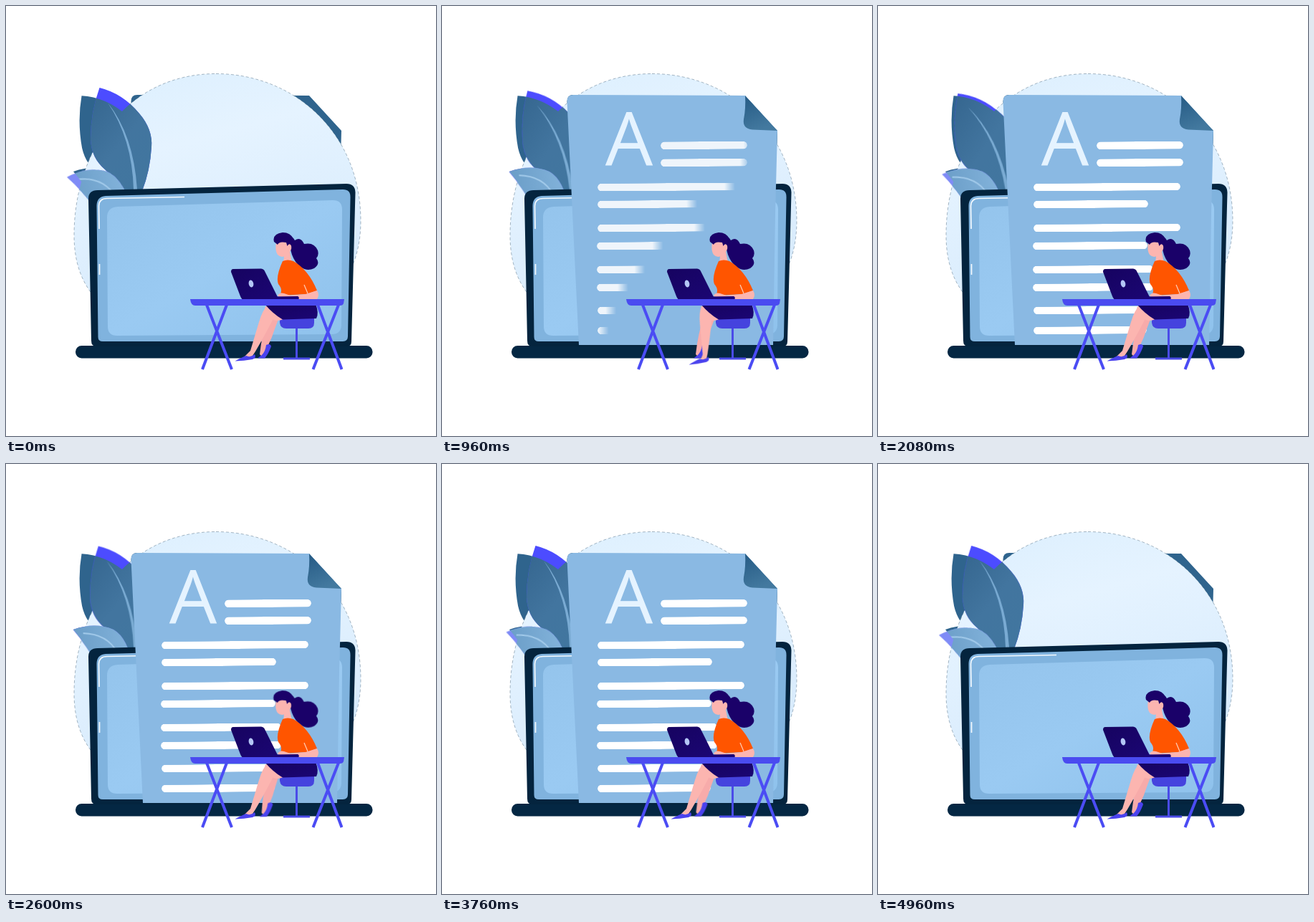
An HTML page that plays this animation: 600x600 px, repeating every 5000 ms.

```html
<!DOCTYPE html>
<html lang="en">
<head>
<meta charset="utf-8">
<title>Writing at a desk</title>
<style>
  html, body { margin: 0; width: 100%; height: 100%; overflow: hidden; background: #fff; }
  .stage { position: relative; width: 600px; height: 600px; overflow: hidden; }
  svg { position: absolute; left: 0; top: 0; width: 600px; height: 600px; }

  /* plants */
  .leaf, .sprig { animation: sway 625ms cubic-bezier(.37, 0, .63, 1) infinite alternate; }
  .leaf { transform-origin: 180px 258px; --from: 0deg; --to: -10.3deg; }
  .sprig { transform-origin: 145px 300px; animation-duration: 833.333ms; --from: -8deg; --to: 0deg; }
  @keyframes sway {
    from { transform: rotate(var(--from)); }
    to { transform: rotate(var(--to)); }
  }

  /* document */
  .paper, .rise { animation: 5s cubic-bezier(.65, 0, .35, 1) infinite; }
  .paper { transform-origin: 305px 263px; animation-name: turn; }
  .rise { animation-name: rise; }
  @keyframes turn {
    0%, 1% { transform: rotate(32deg); }
    16%, 85% { transform: none; }
    98.6%, 100% { transform: rotate(32deg); }
  }
  @keyframes rise {
    0%, 1% { transform: translateY(580px); }
    16%, 85% { transform: none; }
    98.6%, 100% { transform: translateY(580px); }
  }
  .letter {
    font: 400 105px "Open Sans", "Noto Sans", sans-serif; text-anchor: middle;
    transform-origin: 261px 223px; animation: letter 5s ease-in-out infinite;
  }
  @keyframes letter {
    0%, 2% { opacity: 0; transform: scale(1.12); fill: #fff; }
    7% { opacity: .9; transform: scale(1.05); fill: #fafdff; }
    13%, 77% { opacity: 1; transform: none; fill: #e5f3ff; }
    85%, 100% { opacity: 0; transform: scale(1.06); fill: #e5f3ff; }
  }

  .line {
    --soft: 15px; --edge: calc(50% - var(--soft) / 2);
    position: absolute; left: var(--x); top: var(--y); width: var(--w); height: 11px;
    transform: rotate(-.3deg);
    animation: erase 5s calc(var(--i) * 24ms) infinite both;
    -webkit-mask: linear-gradient(90deg, transparent var(--edge), #000 calc(50% + var(--soft) / 2)) 100% 0 / calc(200% + var(--soft)) 100% no-repeat;
    mask: linear-gradient(90deg, transparent var(--edge), #000 calc(50% + var(--soft) / 2)) 100% 0 / calc(200% + var(--soft)) 100% no-repeat;
  }
  .line::before {
    content: ""; position: absolute; inset: 0; border-radius: 6px; background: #fff;
    animation: write 5s calc(var(--i) * 35ms) infinite both;
    -webkit-mask: linear-gradient(90deg, #000 var(--edge), transparent calc(50% + var(--soft) / 2)) 100% 0 / calc(200% + var(--soft)) 100% no-repeat;
    mask: linear-gradient(90deg, #000 var(--edge), transparent calc(50% + var(--soft) / 2)) 100% 0 / calc(200% + var(--soft)) 100% no-repeat;
  }
  @keyframes write {
    0%, 9.6% { -webkit-mask-position: 100% 0; mask-position: 100% 0; animation-timing-function: cubic-bezier(.65, 0, .35, 1); }
    21.6%, 100% { -webkit-mask-position: 0 0; mask-position: 0 0; }
  }
  @keyframes erase {
    0%, 80.8% { -webkit-mask-position: 100% 0; mask-position: 100% 0; animation-timing-function: cubic-bezier(.65, 0, .35, 1); }
    92.8%, 100% { -webkit-mask-position: 0 0; mask-position: 0 0; }
  }
  .lines { animation: dim 5s linear infinite; }
  @keyframes dim {
    0%, 19% { opacity: .86; }
    23%, 80% { opacity: 1; }
    87%, 100% { opacity: .78; }
  }

  /* woman */
  .shin, .shoe, .back-shin, .back-shoe, .head { animation: 5s ease-in-out infinite; }
  .shin { transform-origin: 366px 425px; animation-name: kick; --turn: -22deg; }
  .shoe { transform-origin: 344px 486px; animation-name: kick; --turn: 19deg; }
  .back-shin { transform-origin: 372px 436px; animation-name: shift; --turn: -19deg; }
  .back-shoe { transform-origin: 361px 482px; animation-name: shift; --turn: 10deg; }
  .head { transform-origin: 396px 358px; animation-name: shift; --turn: -4deg; }
  @keyframes kick {
    0%, 4% { transform: none; }
    19.2% { transform: rotate(var(--turn)); }
    35%, 100% { transform: none; }
  }
  @keyframes shift {
    0%, 48% { transform: none; }
    62.4% { transform: rotate(var(--turn)); }
    77%, 100% { transform: none; }
  }
</style>
</head>
<body>
<div class="stage">
  <svg viewBox="0 0 600 600">
    <defs>
      <linearGradient id="sky" x1="0" y1="0" x2=".3" y2="1">
        <stop offset="0" stop-color="#dceffe"/><stop offset=".35" stop-color="#e5f3ff"/><stop offset="1" stop-color="#d6eafc"/>
      </linearGradient>
      <linearGradient id="leafFill" x1=".1" y1="0" x2=".8" y2="1">
        <stop offset="0" stop-color="#35668f"/><stop offset=".55" stop-color="#42759f"/><stop offset="1" stop-color="#41769f"/>
      </linearGradient>
      <linearGradient id="sprigFill">
        <stop offset="0" stop-color="#6a9dc7"/><stop offset="1" stop-color="#84b4dc"/>
      </linearGradient>
      <linearGradient id="foldFill" x1="0" y1="0" x2=".4" y2="1">
        <stop offset="0" stop-color="#255a84"/><stop offset="1" stop-color="#43799f"/>
      </linearGradient>
      <linearGradient id="glass" x1="0" y1="0" x2="1" y2="1">
        <stop offset="0" stop-color="#94c4ec"/><stop offset=".5" stop-color="#9acaf2"/><stop offset="1" stop-color="#8fc2ec"/>
      </linearGradient>
      <linearGradient id="fade" x1="0" y1="0" x2="0" y2="1">
        <stop offset="0" stop-color="#fff" stop-opacity="0"/><stop offset="1" stop-color="#fff"/>
      </linearGradient>

      <path id="blob" d="M293 94.500C400 94.500 495 175 495 300C495 400 420 460 300 460C170 460 95 420 95 320C95 200 170 94.500 293 94.500Z"/>
      <path id="leafShape" d="M130.500 114Q163 122 186 150Q205 172 203 197Q201 230 190 258H160Q154 243 138 228Q119 212 118 186Q118 148 130.500 114Z"/>
      <path id="sprigShape" d="M94 231Q125 220 150 231Q170 242 178 286L130 284Q112 252 94 231Z"/>
      <path id="lid" d="M128 257L475 248Q487 248 487.500 260L482 468Q482 475 476 475L126 475Q119 475 119 467L115 269Q115 257 128 257Z"/>
      <rect id="bar" x="97" y="474" width="414.500" height="17.500" rx="8.500"/>
      <path id="sheet" d="M183 124L423 125L468 174L465 290L462 473L191 473L174.500 134Q174 124 183 124Z"/>

      <clipPath id="visible">
        <use href="#blob"/><use href="#lid"/><use href="#bar"/><use href="#sheet"/>
        <use href="#leafShape" transform="rotate(-10.3 180 258)"/><use href="#sprigShape"/>
      </clipPath>
      <mask id="reveal" maskUnits="userSpaceOnUse" x="0" y="0" width="600" height="600">
        <g class="rise">
          <rect y="-107" width="600" height="220" fill="url(#fade)"/>
          <rect y="113" width="600" height="600" fill="#fff"/>
        </g>
      </mask>
    </defs>

    <g fill="#2f648d">
      <use href="#sheet"/>
      <use href="#leafShape" transform="rotate(-10.3 180 258)"/>
      <use href="#sprigShape"/>
    </g>
    <use href="#blob" fill="url(#sky)" stroke="#35566e" stroke-width=".6" stroke-opacity=".7" stroke-dasharray="4 3"/>

    <g class="leaf"><use href="#leafShape" fill="#4c4cff"/></g>
    <g clip-path="url(#visible)">
      <g class="leaf">
        <use href="#leafShape" fill="url(#leafFill)"/>
        <path d="M142 135Q178 180 183 256L178 256Q176 185 142 135Z" fill="#7aabd3"/>
      </g>
    </g>
    <g class="sprig"><use href="#sprigShape" fill="#7f8bf6"/></g>
    <g clip-path="url(#visible)">
      <g class="sprig">
        <use href="#sprigShape" fill="url(#sprigFill)"/>
        <path d="M108 236Q142 237 156 264" fill="none" stroke="#a3cbeb" stroke-width="1.800"/>
      </g>
    </g>

    <use href="#bar" fill="#042743"/>
    <use href="#lid" fill="#04243e"/>
    <path d="M139 265L470 256Q481 256 480.500 267L477 461Q477 468 470 468L135 468Q128.500 468 128.500 462L126.500 279Q126.500 266 139 265Z" fill="#80b3de"/>
    <path d="M156 280L456 271Q469 271 469 284L468 446Q467 458 455 458L155 460Q142 460 142 447L141 295Q141 281 156 280Z" fill="url(#glass)"/>
    <path d="M130 311L129.500 279Q130 268.500 141 268.500L249 266.500M130.500 360V375" fill="none" stroke="#f4faff" stroke-width="1.700"/>

    <g clip-path="url(#visible)">
      <g class="paper">
        <g mask="url(#reveal)">
          <use href="#sheet" fill="#8ab9e3"/>
          <path d="M423 125L468 174L433 172.500Q419 171 421 158Q424 143 423 125Z" fill="url(#foldFill)"/>
        </g>
      </g>
    </g>
    <text class="letter" x="261" y="223">A</text>
  </svg>

  <div class="lines">
    <div class="line" style="--i:0;--x:305px;--y:189px;--w:121px"></div>
    <div class="line" style="--i:1;--x:305px;--y:212.500px;--w:121px"></div>
    <div class="line" style="--i:2;--x:217px;--y:246.500px;--w:205px"></div>
    <div class="line" style="--i:3;--x:217px;--y:270.500px;--w:160px"></div>
    <div class="line" style="--i:4;--x:217px;--y:303.500px;--w:205px"></div>
    <div class="line" style="--i:5;--x:215.500px;--y:328.500px;--w:160px"></div>
    <div class="line" style="--i:6;--x:215.500px;--y:361.500px;--w:168px"></div>
    <div class="line" style="--i:7;--x:215.500px;--y:386.500px;--w:168px"></div>
    <div class="line" style="--i:8;--x:217px;--y:419px;--w:158px"></div>
    <div class="line" style="--i:9;--x:217px;--y:446.500px;--w:158px"></div>
  </div>

  <svg viewBox="0 0 600 600">
    <defs>
      <linearGradient id="navy" x1="0" y1="0" x2="1" y2="1">
        <stop offset="0" stop-color="#160360"/><stop offset="1" stop-color="#1b0674"/>
      </linearGradient>
    </defs>

    <!-- stool -->
    <path d="M405.500 448V492M387 492H424" stroke="#4a4be8" stroke-width="3" fill="none"/>
    <path d="M382 436H430V442Q430 450 422 450H391Q383 450 382 442Z" fill="#4543de"/>

    <!-- legs -->
    <g class="back-shin">
      <path d="M366 430L381 435Q375 450 371 462L362 482L357 489L354 486Q357 458 366 430Z" fill="#f7abaa"/>
      <path class="back-shoe" d="M351 491.500L357 487Q362 482 363 473Q369 470 370 475Q366 486 361 491.500Z" fill="#4a42ee"/>
    </g>
    <g class="shin">
      <path d="M365 418Q358 424 353 441L341 481L333 489L342 491L348 482Q362 458 372 438Q376 424 365 418Z" fill="#fcb5b0"/>
      <path class="shoe" d="M319.500 495.500Q329 490 335 488Q341 491 347 486Q350 491 344 493Q332 495 319.500 495.500Z" fill="#4a42ee"/>
    </g>
    <path d="M361 421Q366 415 374 418L387 437Q378 441 371 437Z" fill="#fcb5b0"/>
    <path d="M361 416H432Q437 428 433 436L386 437.500Q373 430 361 416Z" fill="url(#navy)"/>

    <!-- head -->
    <g class="head">
      <path d="M392 322Q399 319 403 327Q411 321 416 332Q430 329 435 341Q437 348 433 352Q439 360 430 366Q420 371 411 364Q403 358 399 347Z" fill="#1a0169"/>
      <path d="M377 330Q375 341 379 347Q383 351 388 349.500L387 358L399 358L396 343Q400 338 397 332Q393 325 377 330Z" fill="#fcb5b0"/>
      <path d="M374 329Q371 318 386 316Q397 316 401 325L398 334Q395 330 392.500 335L391 330Q381 328 379 333Z" fill="#1a0169"/>
    </g>

    <!-- body -->
    <path d="M386 356Q393 353 401 356Q422 368 434 397L420 402L382 404Q387 396 380 388Q376 378 386 356Z" fill="#ff5500"/>
    <path d="M416 389L421 401" stroke="#ffd0b8" stroke-width="1.200"/>
    <path d="M418 402L434 397Q438 403 434 409H386L379 404Q382 399 388 401L397 404Z" fill="#fcb5b0"/>

    <!-- laptop -->
    <path d="M317 367L356 366.500Q360 367 361 370L381 410H332Q329 410 327 405L314 371Q314 367 317 367Z" fill="url(#navy)"/>
    <path d="M372 405.500L407 405Q410 406 408 410H372Z" fill="#1b0578"/>
    <ellipse cx="342" cy="387.500" rx="3.300" ry="5" transform="rotate(-12 342 387.500)" fill="#b4c6f6"/>

    <!-- table -->
    <path d="M280 417L315 507M308 417L274 507M435 417L468.500 507M464 417L428.500 507" stroke="#4b4cf4" stroke-width="4" fill="none"/>
    <path d="M257 409H472L471 415Q470 418 466 418H264Q258 418 257 409Z" fill="#4a4bf0"/>
  </svg>
</div>
</body>
</html>
```
